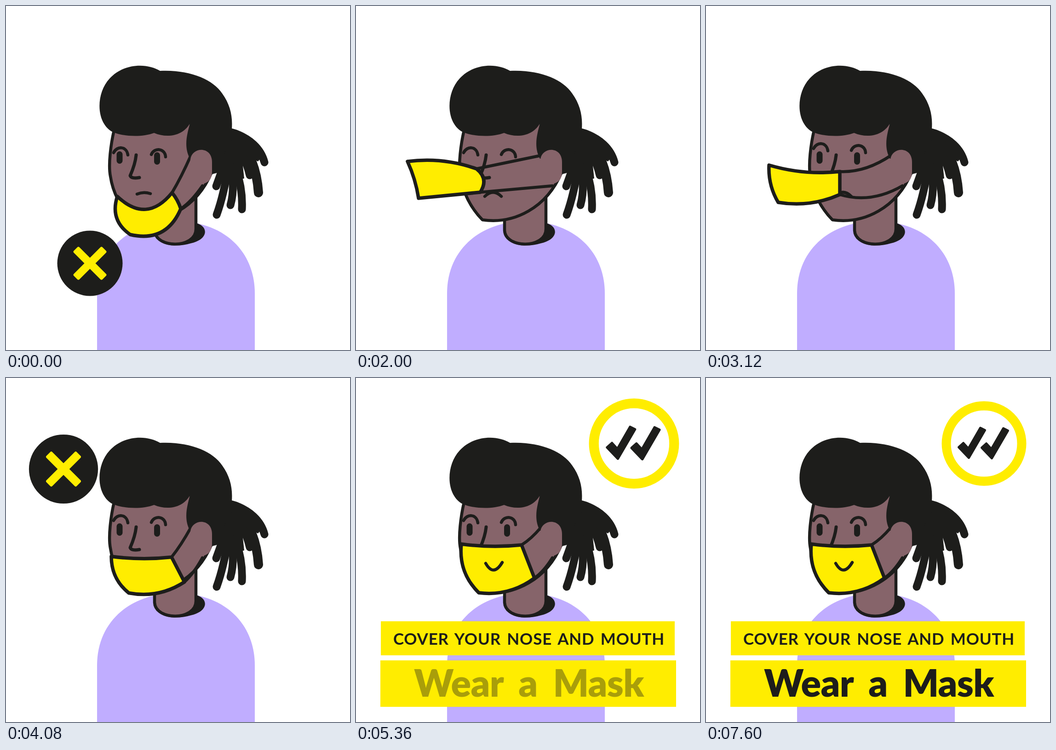
These frames come from a looping animation (748x748 px, 7680 ms). An HTML page:

```html
<!DOCTYPE html>
<html lang="en">
<head>
<meta charset="utf-8">
<title>Wear a mask</title>
<style>
  html, body { margin: 0; width: 100%; height: 100%; overflow: hidden; background: #fff; }
  svg { display: block; width: 100vw; height: 100vh; }
  .ink { fill: #1d1d1b; }
  .skin { fill: #86646a; }
  .yellow { fill: #ffed00; }
  .line { stroke: #1d1d1b; stroke-width: 6.5; stroke-linecap: round; stroke-linejoin: round; }
  .open { fill: none; }
  text { font-family: Lato, "Open Sans", sans-serif; text-anchor: middle; fill: #1d1d1b; }
  #text1 { font-size: 35px; font-weight: 700; letter-spacing: .8px; word-spacing: 4px; }
  #text2 { font-size: 81px; font-weight: 900; letter-spacing: -.7px; word-spacing: 16px; }
</style>
</head>
<body>
<svg viewBox="0 0 748 748">
  <defs>
    <g id="cross">
      <circle class="ink" r="71"/>
      <g class="yellow">
        <rect x="-44" y="-8.5" width="88" height="17" rx="3" transform="rotate(45)"/>
        <rect x="-44" y="-8.5" width="88" height="17" rx="3" transform="rotate(-45)"/>
      </g>
    </g>
    <path id="tick" class="ink" d="M-55 8L-45-1-34 11-8-34 2-29-33 31z"
      stroke="#1d1d1b" stroke-width="5" stroke-linejoin="round"/>
  </defs>

  <path fill="#c0adff" d="M198 748V625C198 530 270 468 370 468S541 530 541 625V748z"/>
  <path class="ink" d="M413 472C440 478 442 507 402 516C380 523 350 523 335 512L400 470z"/>
  <path class="skin line" d="M323 450V488C325 528 413 528 413 485V410z"/>

  <g id="head">
    <g id="dreads" class="ink">
      <path d="M480 264C510 268 540 285 562 320L548 338 512 320 518 375 502 378 485 382 460 362V300z"/>
      <g class="line open" style="stroke-width:17">
        <path d="M490 276C530 285 555 312 562 340"/>
        <path d="M500 290C530 310 546 360 549 406" style="stroke-width:20"/>
        <path d="M495 300Q520 325 530 368"/>
        <path d="M485 320Q516 380 513 442"/>
        <path d="M485 340Q500 390 488 433"/>
        <path d="M485 340Q474 410 458 454"/>
        <path d="M474 345Q462 378 457 392"/>
      </g>
    </g>
    <path id="lining" class="line" fill="#fff"/>
    <path class="skin line" d="M235 270C228 300 222 345 227 370C232 405 250 440 275 465C345 475 415 438 447 362L400 250z"/>
    <path class="line open" d="M283 324Q281 344 270 369Q273 376 290 373" style="stroke-width:7"/>
    <g id="pupils" class="ink">
      <rect x="240.5" y="316" width="13" height="27" rx="6.5"/>
      <rect x="322" y="318" width="13" height="27" rx="6.5"/>
    </g>
    <g id="lids" class="line open">
      <path d="M234 319C241 304 262 304 265 324"/>
      <path d="M316 323C322 307 346 309 347 328"/>
    </g>
    <path id="mouth" class="line open"/>
    <path id="straps" class="line open"/>
    <path class="ink" d="M232 274C195 255 195 190 225 158C255 125 305 123 335 141C400 138 450 160 470 190C488 215 493 240 491 268L462 362 447 366 440 330 400 332C385 305 395 275 400 255C385 283 350 288 322 276C295 286 255 284 232 274z"/>
    <path class="skin" d="M401 333C405 306 448 304 448 340V360Q448 385 424 387L398 370z"/>
    <path id="mask" class="yellow line" style="stroke-width:7.5"/>
    <path id="smile" class="line open" d="M282 403Q299 433 318 401"/>
  </g>

  <g id="badges"></g>
  <g id="okay">
    <circle r="82" fill="#fff" stroke="#ffed00" stroke-width="20"/>
    <use href="#tick"/>
    <use href="#tick" x="50" y="1"/>
  </g>

  <rect id="bar1" class="yellow" y="529" height="74"/>
  <rect id="bar2" class="yellow" y="614" height="101"/>
  <text id="text1" x="376" y="580">COVER YOUR NOSE AND MOUTH</text>
  <text id="text2" x="376" y="693">Wear a Mask</text>
</svg>
<script>
const LOOP = 7680, STEP = 80;
const $ = id => document.getElementById(id);
const clamp = v => Math.max(0, Math.min(1, v));
const ramp = (t, from, length) => {
  const p = clamp((t - from) / length);
  return p * p * (3 - 2 * p);
};
const mix = (a, b, p) => a.map((v, i) => v + (b[i] - v) * p);

// A pose: four corners clockwise from top left, how far each edge bows outward, strap sag
const pose = (corners, bows, sag) => [...corners, ...bows, sag];
const worn   = pose([229, 361, 360, 363, 388, 435, 267, 467], [-.06, 0, .2, .24], 6);
const chin   = pose([242, 414, 361, 406, 380, 441, 270, 497], [-.54, .1, .42, .37], 6);
const lifted = pose([136, 290, 316, 342, 297, 384, 140, 373], [.5, 0, -.22, .38], 23);
const pulled = pose([112, 338, 262, 354, 270, 405, 136, 418], [.12, .46, 0, -.07], 0);
const swung  = pose([137, 346, 291, 360, 291, 410, 157, 427], [-.1, 0, .15, .15], 20);

// The worn mask moved up or down and squashed below its top edge
const slide = (dy, squash) =>
  worn.map((v, i) => i < 8 && i % 2 ? 361 + dy + (v - 361) * squash : v);
const eyes = slide(-77, .85), nose = slide(-16, .42), mouth = slide(27, .75);

const turns = [
  { at: 880, via: lifted, to: eyes },
  { at: 1840, via: pulled, to: nose },
  { at: 2960, via: swung, to: mouth },
  { at: 4220, via: mix(mouth, worn, .4), to: worn }
];
const SWING = 160, SETTLE = 200, POP = 520;
const lastTurn = turns[3].at, okayAt = lastTurn + POP;

const low = [182.5, 559.5];
const spots = [low, [600, 223], low, [125, 198]];
$('badges').innerHTML = spots.map(() => '<use href="#cross"/>').join('');

const path = (id, d) => $(id).setAttribute('d', d);
const show = (id, on) => { $(id).style.display = on ? '' : 'none'; };
const place = (el, [x, y], scale) => {
  el.setAttribute('transform', `translate(${x} ${y}) scale(${scale})`);
  el.style.display = scale > 0.001 ? '' : 'none';
};

// Quick growth, then a damped wobble around full size
function pop(t, start) {
  const s = t - start;
  if (s < 0) return clamp(1 + s / 120);
  return 1 + 0.46 * clamp(1 - s / 940) ** 1.8 * Math.sin(2 * Math.PI * s / 280);
}

function drawMask(t) {
  const m = turns.reduce((from, { at, via, to }) =>
    mix(mix(from, via, ramp(t, at, SWING)), to, ramp(t, at + SWING, SETTLE)), chin);
  const corner = i => [m[i % 4 * 2], m[i % 4 * 2 + 1]];
  const edge = i => {
    const [x1, y1] = corner(i), [x2, y2] = corner(i + 1), bow = m[8 + i];
    return `Q${(x1 + x2) / 2 + bow * (y2 - y1)} ${(y1 + y2) / 2 - bow * (x2 - x1)} ${x2} ${y2}`;
  };
  const strap = ([x1, y1], x2, y2, sag) =>
    `M${x1} ${y1}Q${(x1 + x2) / 2} ${(y1 + y2) / 2 + sag} ${x2} ${y2}`;

  path('mask', `M${corner(0)}${[0, 1, 2, 3].map(edge).join('')}z`);
  path('straps', strap(corner(1), 402, 325, m[12]) + strap(corner(2), 427, 391, m[12] * 1.5));
  const [x, y] = corner(3);
  path('lining', `M${x + 4} ${y}Q${x + 28} ${y + 20} 238 386V340H${x + 30}z`);
  show('lining', t > 960 && t < 1160);
}

function drawFace(t) {
  show('pupils', t < 880 || t >= 2400);
  show('smile', t >= lastTurn + 260);
  const lid = 8 * (ramp(t, 880, 160) - ramp(t, 1840, 160)) - 9 * ramp(t, 2400, 240);
  $('lids').setAttribute('transform', `translate(0 ${lid})`);
  const k = ramp(t, 1240, 400);
  path('mouth', `M${285 - 5 * k} ${409 + 5 * k}Q${299 - k} ${403 - 7 * k} ${314 + 2 * k} ${408 + 6 * k}`);
}

function drawBar(n, t, inset) {
  const start = okayAt - 120 + 160 * n, left = 26 - n;
  const p = ramp(t, start, 400), bar = $('bar' + n);
  bar.setAttribute('x', left + 29 * p);
  bar.setAttribute('width', (748 - 2 * inset) * p);
  $('text' + n).setAttribute('opacity', clamp((t - start - 360) / 160));
}

function draw(t) {
  // The head nods a little after each turn and the hair follows
  const nod = turns.reduce((sum, { at }) => sum + Math.sin(Math.PI * clamp((t - at - 260) / 800)), 0);
  $('head').setAttribute('transform', `rotate(${1.3 * nod} 370 480)`);
  $('dreads').setAttribute('transform', `rotate(${4 * nod} 480 270)`);
  drawMask(t);
  drawFace(t);

  spots.forEach((spot, i) => {
    const start = i ? turns[i - 1].at + POP : -LOOP;
    place($('badges').children[i], spot, pop(t, start) * clamp((turns[i].at + 80 - t) / 120));
  });
  place($('okay'), [604.5, 142.5], pop(t, okayAt));
  drawBar(1, t, 54.5);
  drawBar(2, t, 52.5);
}

const begin = performance.now();
function frame() {
  const t = (performance.now() - begin) % LOOP;
  draw(Math.floor(t / STEP) * STEP);
  requestAnimationFrame(frame);
}
frame();
</script>
</body>
</html>
```
